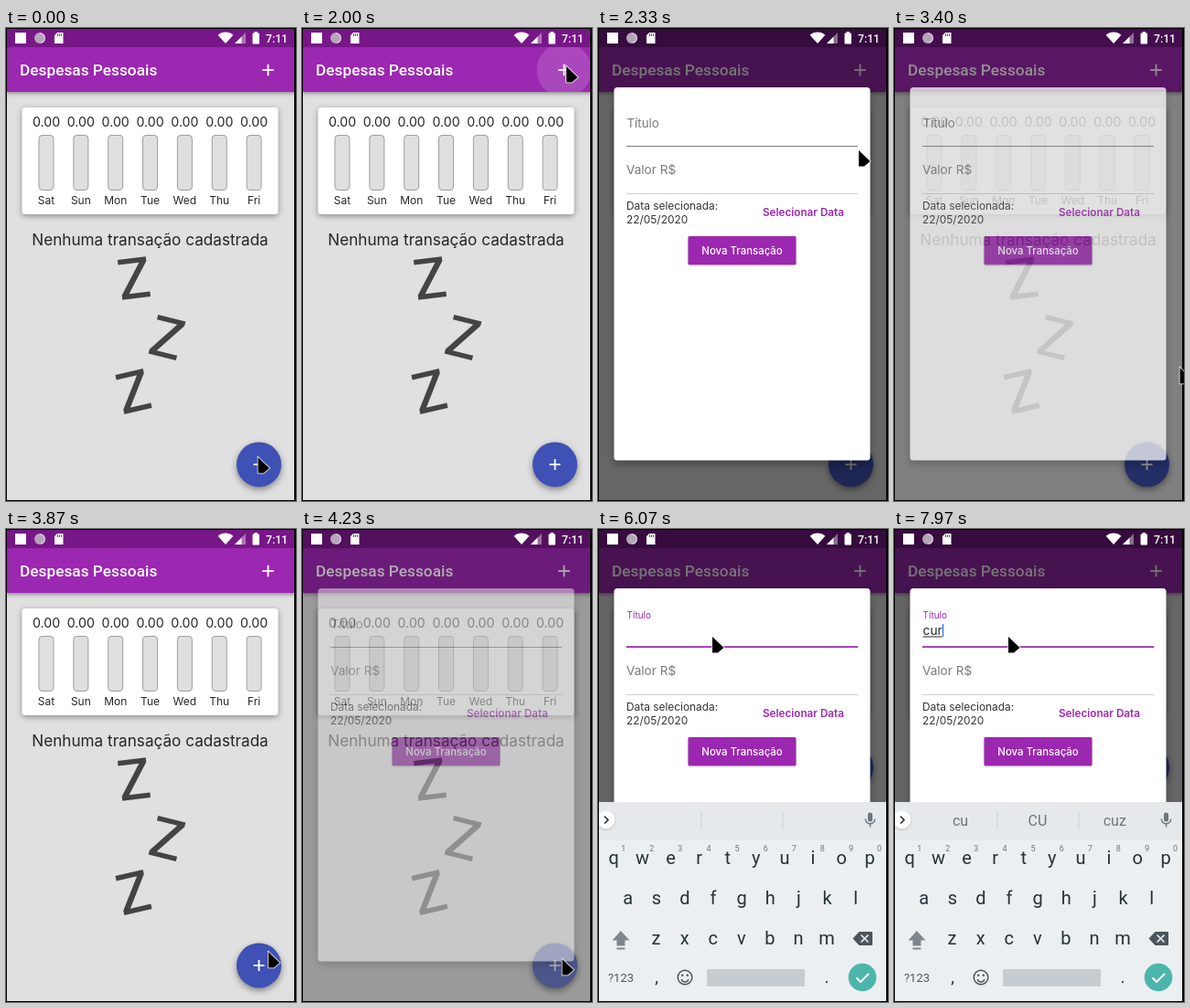
An HTML page with a canvas for the animation above (8000 ms loop, 317 px wide and 518 px high).

```html
<!DOCTYPE html>
<html lang="pt">
<head>
<meta charset="utf-8">
<title>Despesas Pessoais</title>
<style>
html, body { margin: 0; width: 100%; height: 100%; overflow: hidden; background: #000; }
canvas { display: block; width: 317px; height: 518px; }
</style>
</head>
<body>
<canvas id="stage"></canvas>
<script>
const W = 317, H = 518, LOOP = 8000, MID = 157.5;
const PURPLE = '#9c27b0', INK = '#262626', HINT = '#7a7a7a';
const KEY = '#263238', SOFT = '#6b767c', ICON = '#4b565c', KEY_BG = '#eceff1';
const SANS = 'Inter, "Open Sans", sans-serif', ROBOTO = 'Roboto, sans-serif';
const FOCUS = 5430, TYPING = 5660, FIRST_KEY = 7460, KEY_GAP = 250;
const scale = window.devicePixelRatio || 1;

function surface(canvas) {
  canvas.width = W * scale;
  canvas.height = H * scale;
  const ctx = canvas.getContext('2d');
  ctx.scale(scale, scale);
  return ctx;
}
const stage = surface(document.getElementById('stage'));
const layer = surface(document.createElement('canvas'));
let c = stage;

const clamp = v => Math.max(0, Math.min(1, v));
const ramp = (t, from, length) => clamp((t - from) / length);
const ease = k => k * k * (3 - 2 * k);
const between = (t, from, to) => t >= from && t < to;

function box(x, y, w, h, r, fill) {
  c.beginPath();
  c.roundRect(x, y, w, h, r);
  c.fillStyle = fill;
  c.fill();
}
function disc(x, y, r, fill) {
  c.beginPath();
  c.arc(x, y, r, 0, 7);
  c.fillStyle = fill;
  c.fill();
}
function arc(x, y, r, from, to, color, width) {
  c.beginPath();
  c.arc(x, y, r, from, to);
  c.strokeStyle = color;
  c.lineWidth = width;
  c.stroke();
}
function poly(points, fill) {
  c.beginPath();
  points.forEach(p => c.lineTo(...p));
  c.closePath();
  c.fillStyle = fill;
  c.fill();
}
function path(points, color, width) {
  c.beginPath();
  points.forEach(p => c.lineTo(...p));
  c.strokeStyle = color;
  c.lineWidth = width;
  c.stroke();
}
function text(str, x, y, font, color, align = 'left') {
  c.font = font;
  c.fillStyle = color;
  c.textAlign = align;
  c.fillText(str, x, y);
}
function plus(x, y, r) {
  path([[x - r, y], [x + r, y]], '#fff', 1.8);
  path([[x, y - r], [x, y + r]], '#fff', 1.8);
}
function at(x, y, degrees, paint) {
  c.save();
  c.translate(x, y);
  c.rotate(degrees * Math.PI / 180);
  paint();
  c.restore();
}
// Shadows ignore the canvas transform, so they are scaled here.
function raised(blur, y, alpha, paint) {
  c.save();
  c.shadowColor = `rgba(0,0,0,${alpha})`;
  c.shadowBlur = blur * scale;
  c.shadowOffsetY = y * scale;
  paint();
  c.restore();
}

// The letter is its own image under a half turn.
function letterZ() {
  const half = [[-15.5, -16.5], [-15.5, -22], [15.5, -22], [15.5, -17], [-7.5, 16.5]];
  poly([...half, ...half.map(([x, y]) => [-x, -y])], '#444');
}

function chart() {
  raised(6, 2, 0.38, () => box(17.5, 87, 280, 117, 3.5, '#fff'));
  ['Sat', 'Sun', 'Mon', 'Tue', 'Wed', 'Thu', 'Fri'].forEach((day, i) => {
    const x = 44 + i * 37.85;
    text('0.00', x, 108, '14.2px ' + SANS, INK, 'center');
    box(x - 8.5, 117, 17, 61, 4.5, '#9e9e9e');
    box(x - 7.5, 118, 15, 59, 3.5, '#dfdfdf');
    text(day, x, 193, '12px ' + SANS, INK, 'center');
  });
}

function home(t, fabY) {
  box(0, 0, W, H, 0, '#e0e0e0');
  chart();
  text('Nenhuma transação cadastrada', MID, 238, '17.15px ' + SANS, INK, 'center');
  at(140, 274, -7, letterZ);
  at(176, 339, 14, letterZ);
  at(139.5, 398, -13, letterZ);

  raised(4, 2, 0.35, () => box(1, 1, 315, 69, 0, PURPLE));
  text('Despesas Pessoais', 15, 52, '500 17.25px ' + ROBOTO, '#fff');
  const tap = ramp(t, 1700, 250), glow = 0.15 * (1 - ramp(t, 2080, 200));
  if (tap > 0) {
    c.save();
    c.beginPath();
    c.rect(1, 1, 315, 69);
    c.clip();
    disc(286.5, 46, 10 + 20 * tap, `rgba(255,255,255,${glow})`);
    c.restore();
  }
  plus(286.5, 46, 6.3);
  box(1, 1, 315, 20, 0, '#771787');

  raised(7, 3, 0.42, () => disc(276.5, fabY, 24.5, '#3f51b5'));
  const press = ramp(t, 4000, 120) * (1 - ramp(t, 4350, 350));
  disc(276.5, fabY, 24.5, `rgba(255,255,255,${0.25 * press})`);
  plus(276.5, fabY, 6);
}

function titleField(t) {
  if (t >= TYPING) {
    text('Título', 31.5, 98, '10px ' + SANS, PURPLE);
    box(31, 128.25, 253, 1.75, 0, PURPLE);
  } else {
    text('Título', 31.5, 109, '13.3px ' + SANS, t >= FOCUS ? PURPLE : HINT);
    box(31, 129, 253, 1, 0, '#7d7d7d');
  }
  const count = Math.max(0, Math.floor((t - FIRST_KEY) / KEY_GAP) + 1);
  const typed = 'cur'.slice(0, count);
  text(typed, 31.5, 116, '13.8px ' + SANS, INK);
  const width = c.measureText(typed).width;
  box(31.5, 117.5, width, 1, 0, INK);
  const hidden = t < FOCUS || between(t, 6060, 6530) || between(t, 7295, FIRST_KEY);
  if (!hidden) box(31.5 + width, 104, 1.6, 14, 0, '#4285f4');
}

function dialog(t) {
  raised(9, 4, 0.32, () => box(17.5, 65, 280, 408.5, 3.5, '#fff'));
  titleField(t);
  text('Valor R$', 31, 160, '13.6px ' + SANS, HINT);
  box(31, 181, 253, 1, 0, '#cfcfcf');
  text('Data selecionada:', 31, 199, '11.9px ' + SANS, '#333');
  text('22/05/2020', 31, 213.5, '11.9px ' + SANS, '#333');
  text('Selecionar Data', 180, 206, '600 11.7px ' + SANS, PURPLE);
  raised(2, 1, 0.25, () => box(98.5, 228, 118, 31.25, 1.5, PURPLE));
  text('Nova Transação', MID, 248, '500 11.4px ' + SANS, '#fff', 'center');
}

// Opens, stalls while closing, then opens again.
function dialogProgress(t) {
  if (t < 3390) return ramp(t, 2050, 210);
  if (t < 4000) return 0.8 * (1 - ramp(t, 3545, 160));
  return ramp(t, 4112, 210);
}

function status() {
  box(10, 5, 12, 12, 0, '#fff');
  disc(37, 11, 6, '#b5a3ba');
  arc(37, 11, 5.2, -1.6, 1.4, '#d8cbdc', 1.3);
  poly([[56, 5], [62.5, 5], [62.5, 17], [53, 17], [53, 8]], '#fff');
  for (let x = 56; x < 61; x += 2) box(x, 6.3, 1, 2.6, 0, '#7b3b88');
  c.beginPath();
  c.moveTo(240, 17);
  c.arc(240, 17, 12.5, -2.3, -0.84);
  c.fillStyle = '#fff';
  c.fill();
  const signal = (size, fill) => poly([[250 + size, 17 - size], [250 + size, 17], [250, 17]], fill);
  signal(12, 'rgba(255,255,255,.4)');
  signal(7.5, '#fff');
  box(269.5, 5.5, 7.5, 12, 1, '#fff');
  box(271.5, 4, 3.5, 2, 0, '#fff');
  text('7:11', 284, 16, '500 12.2px ' + ROBOTO, '#fff');
}

function suggestions(t) {
  if (t < FIRST_KEY) return [];
  return t < FIRST_KEY + KEY_GAP ? ['c', 'C', "can't"] : ['cu', 'CU', 'cuz'];
}

function keyRow(keys, x, y, size = 20, color = KEY) {
  [...keys].forEach((key, i) =>
    text(key, x + i * 31.1, y, `${size}px ${ROBOTO}`, color, 'center'));
}

function suggestionBar(t) {
  box(1, 299, 315, 42, 0, '#e5e9ec');
  raised(2, 1, 0.2, () => disc(8.5, 318.5, 10, '#fff'));
  path([[7, 314.5], [11, 318.5], [7, 322.5]], KEY, 1.6);
  for (const x of [112.5, 201.5]) box(x, 309, 1, 20, 0, '#cbd1d4');
  suggestions(t).forEach((word, i) =>
    text(word, 72.5 + i * 84.4, 325, '16px ' + ROBOTO, SOFT, 'center'));
  box(295, 310.5, 5, 10, 2.5, SOFT);
  arc(297.5, 317.5, 5.2, 0, Math.PI, SOFT, 1.4);
  box(296.8, 322.5, 1.5, 4, 0, SOFT);
}

function keyboard(t) {
  box(1, 299, 315, 218, 0, KEY_BG);
  suggestionBar(t);
  keyRow('qwertyuiop', 17.3, 367);
  keyRow('1234567890', 27.7, 353, 9, SOFT);
  keyRow('asdfghjkl', 32.8, 411);
  keyRow('zxcvbnm', 63.5, 455);

  poly([[25, 440], [34.5, 450.5], [15.5, 450.5]], '#7d878c');
  box(20.5, 450, 9, 6.5, 0, '#7d878c');
  box(20.5, 458.5, 9, 2, 0, '#7d878c');
  poly([[278.5, 448.5], [285.5, 441], [285.5, 456]], ICON);
  box(285, 441, 15, 15, 1, ICON);
  for (const d of [-4, 4]) path([[287.5, 448.5 - d], [295.5, 448.5 + d]], KEY_BG, 1.7);

  text('?123', 25, 496, '13px ' + ROBOTO, ICON, 'center');
  text(',', 64, 497, '19px ' + ROBOTO, KEY, 'center');
  text('.', 250, 497, '19px ' + ROBOTO, KEY, 'center');
  arc(95, 491, 7.8, 0, 7, ICON, 1.5);
  arc(95, 492, 4, 0.3, Math.PI - 0.3, ICON, 1.5);
  for (const d of [-2.8, 2.8]) disc(95 + d, 488.8, 1.2, ICON);
  box(119, 482, 107, 19, 2, '#c6cccf');
  disc(289, 491, 15.3, '#4db6ac');
  path([[282.5, 491.5], [287, 496], [296, 487]], '#fff', 1.9);
}

// Each glide leaves the last spot; sag bows its path sideways.
const glides = [
  { start: 1134, end: 1233, x: 301, y: 63, sag: -28 },
  { start: 1466, end: 1660, x: 289, y: 42, sag: 0 },
  { start: 2160, end: 2333, x: 285, y: 134, sag: 0 },
  { start: 2367, end: 3167, x: 312.5, y: 372, sag: -34 },
  { start: 3566, end: 3930, x: 284.5, y: 471, sag: 0 },
  { start: 4466, end: 4833, x: 130.5, y: 129.5, sag: 0 },
  { start: 5033, end: 5166, x: 125, y: 118, sag: 0 }
];
function pointer(t) {
  let x = 275.5, y = 470;
  for (const g of glides) {
    const k = ease(ramp(t, g.start, g.end - g.start));
    x += (g.x - x) * k + g.sag * Math.sin(Math.PI * k);
    y += (g.y - y) * k;
  }
  at(x, y, 0, () => {
    const arrow = [[0, 0], [0, 17.5], [6, 17.5], [12.5, 12]];
    path([...arrow, ...arrow.slice(0, 2)], '#fff', 1.5);
    poly(arrow, '#000');
  });
}

function draw(t) {
  const p = dialogProgress(t), typing = t >= TYPING;
  c = stage;
  box(0, 0, W, H, 0, '#000');
  c.save();
  c.beginPath();
  c.rect(1, 1, 314, 516);
  c.clip();
  home(t, typing ? 261 : 478);
  if (p > 0) {
    box(0, 0, W, H, 0, `rgba(0,0,0,${0.54 * p})`);
    c = layer;
    c.clearRect(0, 0, W, H);
    dialog(t);
    c = stage;
    c.globalAlpha = p ** 1.4;
    c.drawImage(layer.canvas, 0, 0, W, H);
    c.globalAlpha = 1;
  }
  status();
  if (typing) at(0, t < 5825 ? 90 : 0, 0, () => keyboard(t));
  c.restore();
  pointer(t);
}

// The screen updates 30 times per second.
const start = performance.now();
function tick() {
  const t = (performance.now() - start) % LOOP;
  draw(Math.floor((t + 4) * 0.03) / 0.03);
  requestAnimationFrame(tick);
}
tick();
</script>
</body>
</html>
```
